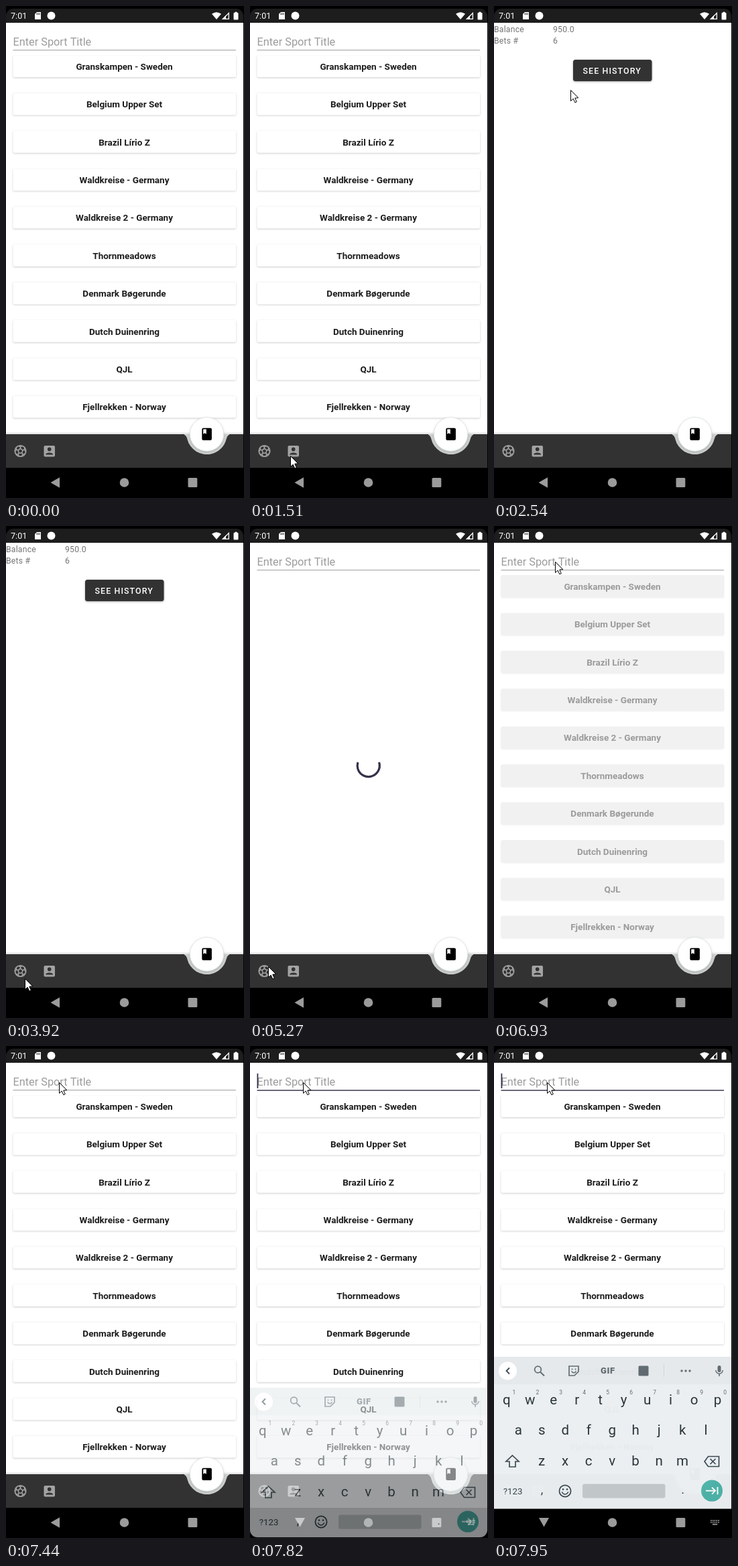
Write an HTML page with a canvas that moves like this. It is 355 by 733 pixels and loops after 8000 ms.

```html
<!DOCTYPE html>
<html lang="en">
<head>
<meta charset="utf-8">
<title>Sports list</title>
<style>
html, body { margin: 0; width: 100%; height: 100%; overflow: hidden; background: #000; }
canvas { display: block; width: 355px; height: 733px; }
</style>
</head>
<body>
<canvas id="stage" width="355" height="733"></canvas>
<script>
const W = 355, H = 733, LOOP = 8000;
const main = document.getElementById('stage').getContext('2d');
let c = main;

const LEAGUES = ['Granskampen - Sweden', 'Belgium Upper Set', 'Brazil Lírio Z', 'Waldkreise - Germany',
  'Waldkreise 2 - Germany', 'Thornmeadows', 'Denmark Bøgerunde', 'Dutch Duinenring', 'QJL', 'Fjellrekken - Norway'];

// Pointer waypoints: time, x, y
const POINTER = [
  [850, 245, 718], [1330, 53, 657], [1510, 60, 670], [2080, 60, 670], [2500, 114, 125],
  [2640, 114, 125], [2920, 48, 27], [3130, 78, 60], [3340, 122, 250], [3590, 114, 469],
  [3640, 114, 469], [3920, 28, 674], [4100, 13, 664], [4300, 27, 656], [5450, 27, 656],
  [5830, 105, 476], [6600, 91, 53], [6940, 91, 53], [7090, 75, 38], [7260, 79, 54]
];

const clamp = v => Math.max(0, Math.min(1, v));
const ramp = (t, a, b) => clamp((t - a) / (b - a));

// Cubic easing with control points (.4, 0) and (.2, 1)
function ease(x) {
  let lo = 0, hi = 1, u = 0.5;
  for (let i = 0; i < 20; i++) {
    u = (lo + hi) / 2;
    const bx = 1.2 * u * (1 - u) ** 2 + 0.6 * u * u * (1 - u) + u ** 3;
    if (bx < x) lo = u; else hi = u;
  }
  return 3 * u * u * (1 - u) + u ** 3;
}

function rect(x, y, w, h, fill, r = 0) {
  c.fillStyle = fill;
  c.beginPath();
  c.roundRect(x, y, w, h, r);
  c.fill();
}

function disc(x, y, r, fill) {
  c.fillStyle = fill;
  c.beginPath();
  c.arc(x, y, r, 0, 7);
  c.fill();
}

function ring(x, y, r, color, width, a = 0, b = 2 * Math.PI) {
  c.strokeStyle = color;
  c.lineWidth = width;
  c.beginPath();
  c.arc(x, y, r, a, b);
  c.stroke();
}

function trace(pts, close) {
  c.beginPath();
  for (let i = 0; i < pts.length; i += 2) c.lineTo(pts[i], pts[i + 1]);
  if (close) c.closePath();
}

function poly(pts, fill) {
  trace(pts, true);
  c.fillStyle = fill;
  c.fill();
}

function line(pts, color, width, close) {
  trace(pts, close);
  c.strokeStyle = color;
  c.lineWidth = width;
  c.stroke();
}

function text(s, x, y, size, color, { weight = 400, align = 'left', gap = 0 } = {}) {
  c.font = `${weight} ${size}px Roboto, sans-serif`;
  c.letterSpacing = gap + 'px';
  c.textAlign = align;
  c.fillStyle = color;
  c.fillText(s, x, y);
}

function shadow(color, blur, dy) {
  c.shadowColor = color;
  c.shadowBlur = blur;
  c.shadowOffsetY = dy;
}

function faded(alpha, draw) {
  if (alpha <= 0) return;
  c.save();
  c.globalAlpha = alpha;
  draw();
  c.restore();
}

function statusBar() {
  rect(0, 4, 354, 21, '#1d1d1d');
  text('7:01', 7, 19.3, 12.6, '#fff');
  poly([46, 9, 52, 9, 52, 20, 43, 20, 43, 12], '#fff');
  for (const x of [46, 48, 50]) rect(x - 0.4, 10.5, 1, 2.5, '#1d1d1d');
  disc(67.5, 14.5, 6, '#fff');
  c.fillStyle = '#fff';
  c.beginPath();
  c.moveTo(314, 20);
  c.lineTo(307, 11.8);
  c.quadraticCurveTo(314, 6.5, 321, 11.8);
  c.fill();
  line([323.5, 19.3, 332.3, 19.3, 332.3, 10.5], '#fff', 1.3, true);
  poly([322, 20, 328, 14, 328, 20], '#fff');
  rect(339.5, 10, 7, 10.5, '#fff', 1);
  rect(341.5, 8.7, 3, 2, '#fff');
}

function ballIcon(x, y) {
  const g = '#a3a3a3';
  ring(x, y, 8.2, g, 1.8);
  const pent = [];
  for (let i = 0; i < 5; i++) {
    const a = -Math.PI / 2 + i * Math.PI * 0.4, cx = Math.cos(a), cy = Math.sin(a);
    pent.push(x + cx * 3.7, y + cy * 3.7);
    line([x + cx * 3.7, y + cy * 3.7, x + cx * 6.2, y + cy * 6.2], g, 1.5);
    const l = a - 0.36, r = a + 0.36;
    line([x + Math.cos(l) * 8, y + Math.sin(l) * 8, x + cx * 5.9, y + cy * 5.9,
      x + Math.cos(r) * 8, y + Math.sin(r) * 8], g, 1.3);
  }
  line(pent, g, 1.5, true);
}

function bottomBar() {
  const x = 299.5, y = 638;
  const g = c.createLinearGradient(0, 634, 0, 638);
  g.addColorStop(0, 'rgba(0,0,0,0)');
  g.addColorStop(1, 'rgba(0,0,0,.13)');
  rect(0, 634, 354, 4, g);
  c.fillStyle = '#cdd0cf';
  c.beginPath();
  c.arc(x, y, 34, 0, Math.PI);
  c.fill();
  c.fillStyle = '#323232';
  c.beginPath();
  c.moveTo(0, y);
  c.lineTo(263, y);
  c.quadraticCurveTo(268.5, y, 270.4, y + 7);
  c.arc(x, y, 30, Math.PI - 0.24, 0.24, true);
  c.quadraticCurveTo(330.5, y, 336, y);
  c.lineTo(354, y);
  c.lineTo(354, 688);
  c.lineTo(0, 688);
  c.fill();
  ballIcon(21.5, 663);
  rect(56.5, 655, 16.5, 16.5, '#a3a3a3', 2);
  disc(64.7, 660.4, 2.8, '#323232');
  c.fillStyle = '#323232';
  c.beginPath();
  c.ellipse(64.7, 668.6, 5.6, 3.2, 0, Math.PI, 0);
  c.fill();
  c.save();
  shadow('rgba(0,0,0,.18)', 4, 1.5);
  disc(x, y, 25, '#fff');
  c.restore();
  ring(x, y, 25.3, '#dbe5e2', 0.8);
  rect(292.3, 628.7, 14.6, 18.4, '#000', 2);
  poly([294.2, 630.4, 298.8, 630.4, 298.8, 637.8, 296.5, 636.3, 294.2, 637.8], '#fff');
}

function navBar(typing) {
  const g = '#9b9b9b';
  rect(0, 688, 354, 45, '#000');
  poly(typing ? [67, 703, 82, 703, 74.5, 716.5] : [66.5, 710, 80, 702.3, 80, 717.7], g);
  disc(176.5, 710, 6.8, g);
  rect(271.5, 703, 13.8, 14, g, 1.5);
  if (!typing) return;
  for (let r = 0; r < 2; r++)
    for (let i = 0; i < 5; i++) rect(323 + i * 2.8, 706 + r * 2.8, 1.7, 1.7, g);
  rect(325.8, 711.8, 7.4, 1.7, g);
}

function field(focused, caret) {
  text('Enter Sport Title', 10.5, 59, 16.3, '#9c9c9c');
  if (focused) rect(10.5, 65.3, 332.5, 1.6, '#575468');
  else rect(10.5, 65.2, 332.5, 1, '#9b9b9b');
  if (caret) rect(10.5, 41, 1.8, 22, '#35314a');
}

function leagueList(alpha) {
  const tint = Math.round(255 - 58 * alpha * (1 - alpha));
  c.save();
  c.beginPath();
  c.rect(0, 73, 354, 566);
  c.clip();
  LEAGUES.forEach((name, i) => {
    const y = 73.3 + i * 56.4;
    c.save();
    shadow(`rgba(0,0,0,${0.2 * alpha})`, 3, 0.9);
    rect(10.5, y, 332.5, 32.7, `rgb(${tint},${tint},${tint})`, 2);
    c.restore();
    faded(alpha, () => text(name, 176.5, y + 21.5, 13.5, '#1c1c1c', { weight: 700, align: 'center' }));
  });
  c.restore();
}

function account() {
  rect(0, 25, 354, 613, '#fff');
  const g = '#757575', o = { gap: 0.22 };
  text('Balance', 0, 39, 12.2, g, o);
  text('950.0', 88, 39, 12.2, g, o);
  text('Bets #', 0, 56.3, 12.2, g, o);
  text('6', 88, 56.3, 12.2, g, o);
  c.save();
  shadow('rgba(0,0,0,.35)', 3, 1);
  rect(118, 80, 117.5, 32, '#323232', 3.5);
  c.restore();
  text('SEE HISTORY', 132.5, 101, 12.4, '#fff', { weight: 500, gap: 1.1 });
}

function spinner(t) {
  const e = t - 4925, p = (e % 1333) / 1333;
  const from = 0.75 * ease(clamp(p * 2 - 1)), to = 0.75 * ease(clamp(p * 2));
  const turn = 2 * Math.PI, base = turn * (0.25 * p + 2 * e / 4444 - 0.27);
  ring(176.7, 357, 16.6, '#35314a', 3.2, base + from * turn, base + Math.max(to, from + 0.02) * turn);
}

function toolStrip() {
  const g = '#5f6b71', y = 484;
  disc(20.5, y, 13.5, '#fff');
  line([23, y - 4.5, 18.5, y, 23, y + 4.5], '#37474f', 1.8);
  ring(65.5, y - 2, 4.8, g, 1.8);
  line([69, y + 1.5, 75, y + 7.5], g, 2);
  line([112, 477, 126, 477, 126, 485, 120, 491, 112, 491], g, 1.7, true);
  ring(119, 483.5, 3.3, g, 1.4, 0.2, 2.9);
  disc(116.5, 481.5, 1, g);
  disc(121.5, 481.5, 1, g);
  text('GIF', 159, 488.3, 13, g, { weight: 900, gap: 0.6 });
  rect(215.5, 476.5, 15, 15, g, 1.5);
  rect(253, 474, 1, 19, '#cfd5d8');
  for (const x of [280, 286, 292]) disc(x, y, 1.7, g);
  rect(333.5, 476, 5, 10, g, 2.5);
  ring(336, 483, 5.2, g, 1.5, 0, Math.PI);
  rect(335.2, 488, 1.6, 4, g);
}

function keyboard() {
  const ink = '#263238', soft = '#37474f';
  rect(0, 463, 354, 226.5, '#eceff1');
  rect(0, 463, 354, 41, '#e5e9eb');
  toolStrip();
  const mid = { align: 'center' };
  [['qwertyuiop', 18.8, 533.5], ['asdfghjkl', 36.3, 579], ['zxcvbnm', 71.2, 624.5]].forEach(([keys, x, y], row) => {
    [...keys].forEach((k, i) => {
      const kx = x + i * 34.97;
      text(k, kx, y, 20.5, ink, mid);
      if (!row) text(String((i + 1) % 10), kx + 11, 519, 8.5, '#5f6b71', mid);
    });
  });
  line([27.5, 610, 37, 619, 32, 619, 32, 627, 23, 627, 23, 619, 18, 619], soft, 1.7, true);
  line([314, 619, 319.5, 611.5, 335.5, 611.5, 335.5, 626.5, 319.5, 626.5], soft, 1.7, true);
  line([322.5, 615, 330.5, 623], soft, 1.7);
  line([330.5, 615, 322.5, 623], soft, 1.7);
  text('?123', 28, 667.7, 13.3, soft, mid);
  text(',', 71.5, 667, 18, soft, mid);
  ring(106, 663, 8.6, soft, 1.7);
  disc(103, 660.5, 1.3, soft);
  disc(109, 660.5, 1.3, soft);
  ring(106, 663, 4.8, soft, 1.5, 0.25, 2.9);
  rect(132, 652.5, 123.5, 21, '#c4c9cc', 3);
  text('.', 281.5, 667, 18, soft, mid);
  disc(325, 662.6, 16, '#4db3a9');
  line([316, 662.6, 329.5, 662.6], '#fff', 1.9);
  line([325, 657.6, 330, 662.6, 325, 667.6], '#fff', 1.9);
  line([333.5, 657, 333.5, 668.2], '#fff', 1.9);
}

// The keyboard is painted once so that it can fade as a single layer
const keyLayer = document.createElement('canvas');
keyLayer.width = W;
keyLayer.height = H;
c = keyLayer.getContext('2d');
keyboard();
c = main;

function pointer(t) {
  if (t < POINTER[0][0]) return;
  let i = 0;
  while (i < POINTER.length - 2 && t > POINTER[i + 1][0]) i++;
  const [t0, x0, y0] = POINTER[i], [t1, x1, y1] = POINTER[i + 1];
  const p = ramp(t, t0, t1), s = p * p * (3 - 2 * p);
  c.save();
  c.translate(Math.round(x0 + (x1 - x0) * s) + 0.5, Math.round(y0 + (y1 - y0) * s) + 0.5);
  const shape = [0, 0, 0, 16, 3.7, 12.6, 6.3, 18.3, 8.8, 17.2, 6.3, 11.6, 11.3, 11.3];
  poly(shape, '#fff');
  line(shape, '#000', 1, true);
  c.restore();
}

function draw(t) {
  c.fillStyle = '#000';
  c.fillRect(0, 0, W, H);
  c.save();
  c.beginPath();
  c.roundRect(0, 4, 354, 728, 11);
  c.clip();
  rect(0, 25, 354, 613, '#fff');
  const typing = t >= 7470;

  if (t < 4660) {
    field(false, false);
    if (t < 2130) leagueList(1);
    faded(t < 4530 ? ramp(t, 2000, 2130) : 1 - ramp(t, 4530, 4660), account);
  } else {
    field(typing, typing);
    const shown = ramp(t, 6830, 7080);
    if (shown > 0) leagueList(shown);
    if (t >= 5040 && t < 6700) spinner(t);
  }

  statusBar();
  bottomBar();
  navBar(t >= 7650);
  const rise = ramp(t, 7650, 7950);
  faded(0.98 * ramp(t, 7650, 7948), () => c.drawImage(keyLayer, 0, Math.round(107 * (1 - rise))));
  pointer(t);
  c.restore();
}

const start = performance.now();
function tick(now) {
  draw(Math.max(0, now - start) % LOOP);
  requestAnimationFrame(tick);
}
draw(0);
requestAnimationFrame(tick);
</script>
</body>
</html>
```
